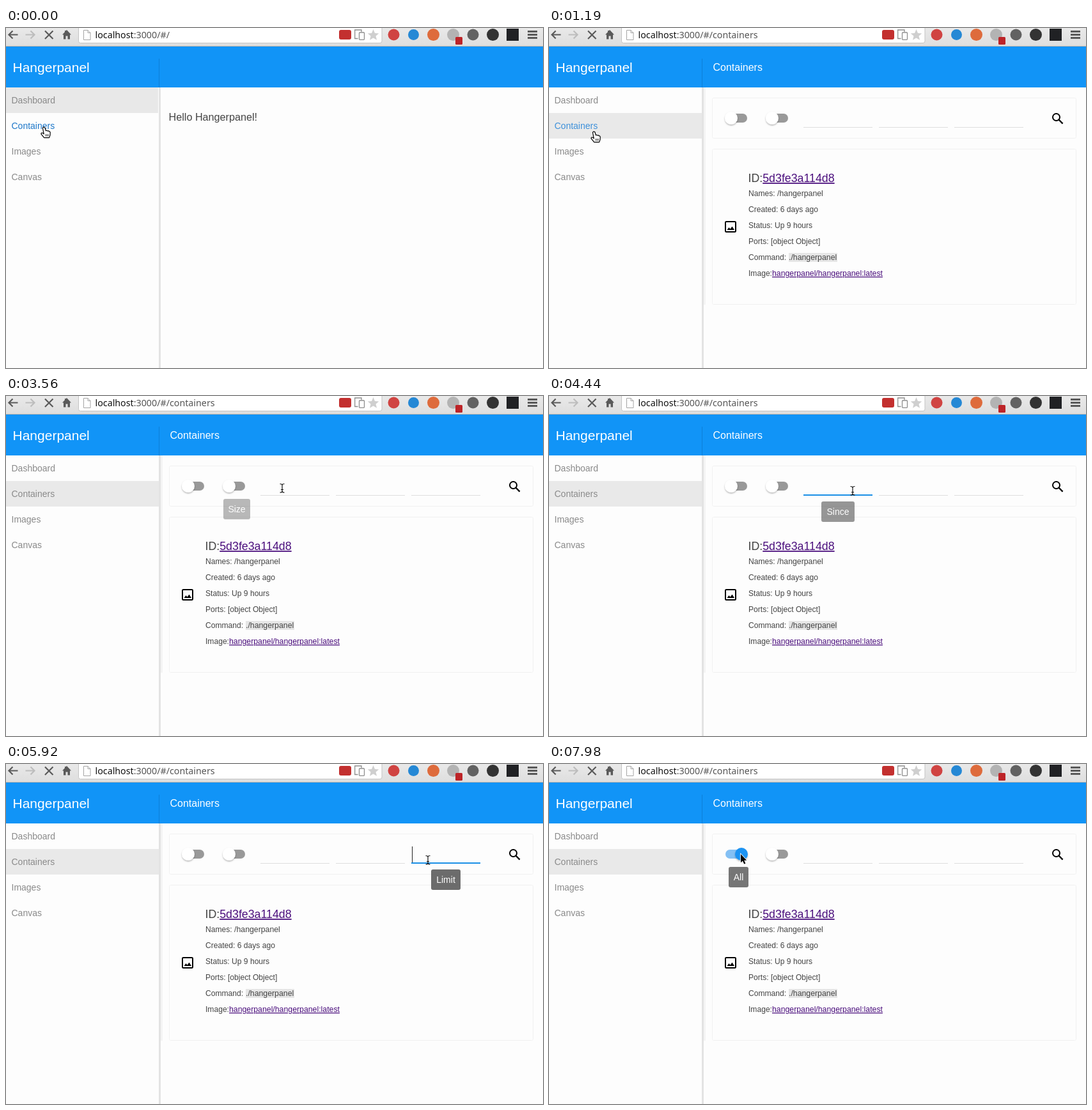
These frames come from a looping animation (840 by 532 pixels, 8000 ms). An HTML page:

```html
<!DOCTYPE html>
<html lang="en">
<head>
<meta charset="utf-8">
<title>Container dashboard</title>
<style>
html, body { margin: 0; width: 100%; height: 100%; overflow: hidden; background: #fdfdfd; }
svg { display: block; width: 100%; height: 100%; font-family: "Liberation Sans", Arial, sans-serif; }
text { white-space: pre; }

.url { font: 14.25px "Noto Sans", sans-serif; fill: #555; }
.url .host { fill: #111; }
.menu { font-size: 14px; fill: #8a8a8a; }
.details { font-size: 12.1px; fill: #444; }
.details .wide { font-size: 12.3px; }
.link { fill: #4b0f7d; text-decoration: underline; }
.tip { font-size: 14px; fill: #fff; opacity: 0; }
.tip rect { fill: #525252; }
.line { fill: #dedede; }
.focus { fill: #1a8fe6; opacity: 0; }
.caret { fill: #222; opacity: 0; }

/* Every part shares one 8 s clock and changes in hard steps. */
.a { animation: 8s step-end infinite; }
.before { animation-name: before; }
.after { animation-name: after; opacity: 0; }
.cards { animation-name: cards; opacity: 0; }
.dash { animation-name: dash; }
.hover { animation-name: hover; fill: #1d77c9; }
.path { animation-name: path; transform: translate(60px, 155px); }
.hand { animation-name: hand; }
.arrow { animation-name: arrow; opacity: 0; }
.beam { animation-name: beam; opacity: 0; }
.knob { animation-name: knob; fill: #fff; }
.track { animation-name: track; fill: #999; }
.tip-all { animation-name: tip-all; }
.tip-size { animation-name: tip-size; }
.tip-since { animation-name: tip-since; }
.tip-before { animation-name: tip-before; }
.tip-limit { animation-name: tip-limit; }
.focus1 { animation-name: focus1; }
.focus2 { animation-name: focus2; }
.focus3 { animation-name: focus3; }
.caret1 { animation-name: caret1; }
.caret2 { animation-name: caret2; }
.caret3 { animation-name: caret3; }

@keyframes before { 0% { opacity: 1 } 5.6%, 100% { opacity: 0 } }
@keyframes after { 0% { opacity: 0 } 5.6%, 100% { opacity: 1 } }
@keyframes cards { 0% { opacity: 0 } 7.5% { opacity: .5 } 9.3%, 100% { opacity: 1 } }
@keyframes dash { 0% { opacity: 1 } 1.85%, 100% { opacity: 0 } }
@keyframes hover { 0% { fill: #1d77c9 } 1.85% { fill: #3d90da } 20.5%, 100% { fill: #8a8a8a } }

@keyframes path {
  0% { transform: translate(60px, 155px) }
  13% { transform: translate(66px, 158px) }
  14.8% { transform: translate(71px, 162px) }
  16.7% { transform: translate(95px, 158px) }
  18.6% { transform: translate(150px, 152px) }
  20.5% { transform: translate(250px, 152px) }
  22.3% { transform: translate(298px, 150px) }
  31.5% { transform: translate(330px, 143px) }
  33.3% { transform: translate(362px, 137px) }
  42.6% { transform: translate(402px, 142px) }
  44.5% { transform: translate(432px, 144px) }
  46.3% { transform: translate(440px, 146px) }
  53.7% { transform: translate(475px, 148px) }
  55.6% { transform: translate(530px, 150px) }
  57.3% { transform: translate(560px, 150px) }
  64.8% { transform: translate(605px, 150px) }
  66.6% { transform: translate(660px, 150px) }
  79.6% { transform: translate(630px, 147px) }
  81.5% { transform: translate(500px, 141px) }
  83.3% { transform: translate(360px, 131px) }
  85% { transform: translate(299px, 127px) }
  87% { transform: translate(299px, 134px) }
  88.7%, 100% { transform: translate(300px, 141px) }
}
@keyframes hand { 0% { opacity: 1 } 20.5%, 100% { opacity: 0 } }
@keyframes arrow { 0%, 42.6% { opacity: 0 } 20.5%, 83.3%, 100% { opacity: 1 } }
@keyframes beam { 0%, 83.3%, 100% { opacity: 0 } 42.6% { opacity: 1 } }

@keyframes tip-all {
  0%, 35.2% { opacity: 0 } 27.8% { opacity: .45 } 29.6%, 31.5% { opacity: .85 } 33.3% { opacity: .6 }
  96.2% { opacity: .3 } 98% { opacity: .6 } 99.7%, 100% { opacity: .79 }
}
@keyframes tip-size { 0%, 48.2%, 100% { opacity: 0 } 38.8% { opacity: .45 } 40.7% { opacity: .85 } 42.6% { opacity: .7 } 44.5% { opacity: .4 } 46.3% { opacity: .12 } }
@keyframes tip-since { 0%, 57.3%, 100% { opacity: 0 } 46.3% { opacity: .4 } 48.2% { opacity: .85 } 53.7% { opacity: .6 } 55.6% { opacity: .28 } }
@keyframes tip-before { 0%, 68.3%, 100% { opacity: 0 } 59.2% { opacity: .45 } 61.1% { opacity: .85 } 64.8% { opacity: .6 } 66.6% { opacity: .28 } }
@keyframes tip-limit { 0%, 83.3%, 100% { opacity: 0 } 72.1% { opacity: .45 } 74% { opacity: .85 } 79.6% { opacity: .6 } 81.5% { opacity: .28 } }

@keyframes focus1 { 0%, 57.3%, 100% { opacity: 0 } 46.3% { opacity: 1 } }
@keyframes focus2 { 0%, 70.2%, 100% { opacity: 0 } 57.3% { opacity: 1 } }
@keyframes focus3 { 0%, 92.5%, 100% { opacity: 0 } 70.2% { opacity: 1 } }
@keyframes caret1 { 0%, 53.7%, 100% { opacity: 0 } 46.3% { opacity: 1 } }
@keyframes caret2 { 0%, 64.8%, 100% { opacity: 0 } 57.3% { opacity: 1 } }
@keyframes caret3 { 0%, 75.8%, 88.7%, 100% { opacity: 0 } 70.2%, 83.3% { opacity: 1 } }

@keyframes knob {
  0% { transform: none; fill: #fff }
  92.5% { transform: translateX(8px); fill: #90caf9 }
  94.3%, 100% { transform: translateX(16px); fill: #1e93f2 }
}
@keyframes track {
  0% { transform: none; fill: #999 }
  92.5%, 100% { transform: translateX(-2px); fill: #84c0f4 }
}
</style>
</head>
<body>
<svg viewBox="0 0 840 532">
  <defs>
    <linearGradient id="chrome" x2="0" y2="1">
      <stop stop-color="#e9e9e9"/><stop offset="1" stop-color="#dedede"/>
    </linearGradient>
    <filter id="shadow" x="-40%" y="-40%" width="180%" height="180%">
      <feDropShadow dx="0" dy="1.5" stdDeviation="1.3" flood-opacity=".3"/>
    </filter>
  </defs>

  <rect width="840" height="532" fill="#fdfdfd"/>

  <!-- Browser bar -->
  <rect width="840" height="28" fill="url(#chrome)"/>
  <rect y="28" width="840" height="1" fill="#b9b4ae"/>
  <path d="M113.5 -2V20.5Q113.5 23.5 116.5 23.5H585Q588 23.5 588 20.5V-2" fill="#fff" stroke="#c4c4c4"/>
  <g fill="none" stroke="#5a5a5a" stroke-width="2.2">
    <path d="M18.5 10.5H4.5M10.5 4.5L4.5 10.5L10.5 16.5"/>
    <path d="M30.5 10.5H44.5M38.5 4.5L44.5 10.5L38.5 16.5" stroke="#bdbdbd"/>
    <path d="M61 4.5L73.5 17M73.5 4.5L61 17"/>
    <path d="M816 5.5H831M816 10.5H831M816 15.5H831" stroke-width="3"/>
  </g>
  <path d="M95 3L102 10.5H100V17.5H96.5V12.5H93.5V17.5H90V10.5H88L92 6.2V4H93.5V4.6Z" fill="#5a5a5a"/>
  <path d="M121.5 3.5H128L132 7.5V18.5H121.5ZM128 3.5V7.5H132" fill="#fff" stroke="#a5a5a5"/>
  <text class="url" x="139.5" y="16"><tspan class="host">localhost</tspan>:3000/#/<tspan class="a after">containers</tspan></text>
  <rect x="521" y="3" width="19" height="15" rx="3" fill="#c3302f"/>
  <g fill="#fff" stroke="#8d8d8d" stroke-width="1.3">
    <path d="M550.5 16.5H545.7V3H556V6"/><rect x="552.5" y="7" width="8" height="11.3" rx="1"/>
  </g>
  <path d="M574.5 2L577 8L583.3 8.4L578.5 12.6L580 18.8L574.5 15.4L569 18.8L570.5 12.6L565.7 8.4L572 8Z" fill="#cfcfcf"/>
  <circle cx="606.5" cy="10.5" r="9" fill="#d04442"/>
  <circle cx="637.5" cy="10.5" r="8.5" fill="#2588d5"/>
  <circle cx="668.5" cy="10.5" r="9.5" fill="#de6b3c"/>
  <circle cx="699.5" cy="10.5" r="9.5" fill="#b3b3b3"/>
  <rect x="703" y="14" width="11" height="12" rx="1.5" fill="#bd2428"/>
  <circle cx="730.5" cy="10.5" r="9" fill="#626262"/>
  <circle cx="761.5" cy="10.5" r="9.5" fill="#333"/>
  <rect x="783" y="1" width="19" height="19" fill="#202124"/>

  <!-- App header -->
  <rect y="29" width="840" height="64" fill="#1194f7"/>
  <rect x="239" y="48" width="1" height="45" fill="#0d80d8"/>
  <text x="10.5" y="69" font-size="21" fill="#fff">Hangerpanel</text>
  <text class="a after" x="256.5" y="67" font-size="16" fill="#fff">Containers</text>

  <!-- Side menu -->
  <rect x="239" y="93" width="3" height="439" fill="#e3e3e3"/>
  <rect class="a dash" y="93" width="238" height="40" fill="#e8e8e8"/>
  <rect class="a after" y="133" width="239" height="40" fill="#e9e9e9"/>
  <g class="menu">
    <text x="8.5" y="118">Dashboard</text>
    <text class="a hover" x="8.5" y="158">Containers</text>
    <text x="8.5" y="198">Images</text>
    <text x="8.5" y="238">Canvas</text>
  </g>

  <text class="a before" x="254.5" y="145" font-size="16.2" fill="#444">Hello Hangerpanel!</text>

  <g class="a cards">
    <rect x="242" y="93" width="3" height="340" fill="#f4f4f4"/>
    <g fill="#fdfdfd" stroke="#f1f1f1">
      <rect x="255.5" y="109.5" width="569" height="63" rx="2"/>
      <rect x="255.5" y="189.5" width="569" height="243" rx="2"/>
    </g>

    <!-- Filter bar -->
    <rect class="a track" x="278" y="134" width="32" height="14" rx="7"/>
    <circle class="a knob" cx="285" cy="141" r="10" filter="url(#shadow)"/>
    <rect x="342" y="134" width="32" height="14" rx="7" fill="#999"/>
    <circle cx="349" cy="141" r="10" fill="#fff" filter="url(#shadow)"/>
    <g class="line">
      <rect x="398" y="155" width="108" height="1"/>
      <rect x="516" y="155" width="108" height="1"/>
      <rect x="634" y="155" width="108" height="1"/>
    </g>
    <rect class="a focus focus1" x="398" y="154" width="108" height="2"/>
    <rect class="a focus focus2" x="516" y="154" width="108" height="2"/>
    <rect class="a focus focus3" x="634" y="154" width="108" height="2"/>
    <rect class="a caret caret1" x="399" y="129" width="1" height="25"/>
    <rect class="a caret caret2" x="517" y="129" width="1" height="25"/>
    <rect class="a caret caret3" x="635" y="129" width="1" height="25"/>
    <g fill="none" stroke="#000">
      <circle cx="793.5" cy="139.5" r="5.5" stroke-width="2"/>
      <path d="M797.5 143.5L803.6 149.6" stroke-width="2.3"/>
      <rect x="276" y="303" width="16" height="16" rx="1.3" stroke-width="2"/>
    </g>
    <path d="M278.5 316L281.5 312L283.5 314.5L286.5 310.5L290 316Z"/>

    <!-- Container details -->
    <text x="311.5" y="241" font-size="17.8" fill="#444">ID:<tspan class="link">5d3fe3a114d8</tspan></text>
    <rect x="375" y="352" width="76" height="14" fill="#e6e6e6"/>
    <g class="details">
      <text x="312" y="263">Names: <tspan class="wide">/hangerpanel</tspan></text>
      <text x="312" y="288">Created: 6 days ago</text>
      <text x="312" y="313">Status: Up 9 hours</text>
      <text x="312" y="338">Ports: [object Object]</text>
      <text x="312" y="363">Command: <tspan class="wide" x="375">./hangerpanel</tspan></text>
      <text x="312" y="388">Image:<tspan class="wide link">hangerpanel/hangerpanel:latest</tspan></text>
    </g>
  </g>

  <!-- Tooltips -->
  <g text-anchor="middle">
    <g class="a tip tip-all"><rect x="281" y="161" width="31" height="32" rx="3"/><text x="296.5" y="182">All</text></g>
    <g class="a tip tip-size"><rect x="340" y="161" width="42" height="32" rx="3"/><text x="361" y="182">Size</text></g>
    <g class="a tip tip-since"><rect x="426" y="165" width="52" height="32" rx="3"/><text x="452" y="186">Since</text></g>
    <g class="a tip tip-before"><rect x="541" y="165" width="57" height="32" rx="3"/><text x="569.5" y="186">Before</text></g>
    <g class="a tip tip-limit"><rect x="665" y="165" width="46" height="32" rx="3"/><text x="688" y="186">Limit</text></g>
  </g>

  <!-- Pointer -->
  <g class="a path">
    <g class="a hand" fill="#fff" stroke="#000" stroke-width="1.2" stroke-linejoin="round">
      <path d="M-2.6 1.5Q-1.3 -1 .8 .8L2.4 5.8Q3.9 4.5 4.9 6.2Q6.6 5.1 7.4 7Q9 6.5 9.2 8.4L9 12.6L7.6 16.6H-.4L-5 10.8Q-5 8.6 -3 9.1L-.8 10.8Z"/>
      <path d="M2.2 11.2V14.5M4.2 11.2V14.5M6.2 11.2V14.5" stroke-width=".8"/>
    </g>
    <path class="a arrow" d="M0 0V13.2L3 10.5L5.2 15.6L7.4 14.7L5.2 9.7H9.2Z" stroke="#fff" stroke-width="1.6" paint-order="stroke"/>
    <path class="a beam" d="M-3.5 -6.5Q0 -6.5 0 -4.5Q0 -6.5 3.5 -6.5M0 -4.5V5M-3.5 7Q0 7 0 5Q0 7 3.5 7M-2 2.5H2" fill="none" stroke="#111" stroke-width="1.2"/>
  </g>
</svg>
</body>
</html>
```
